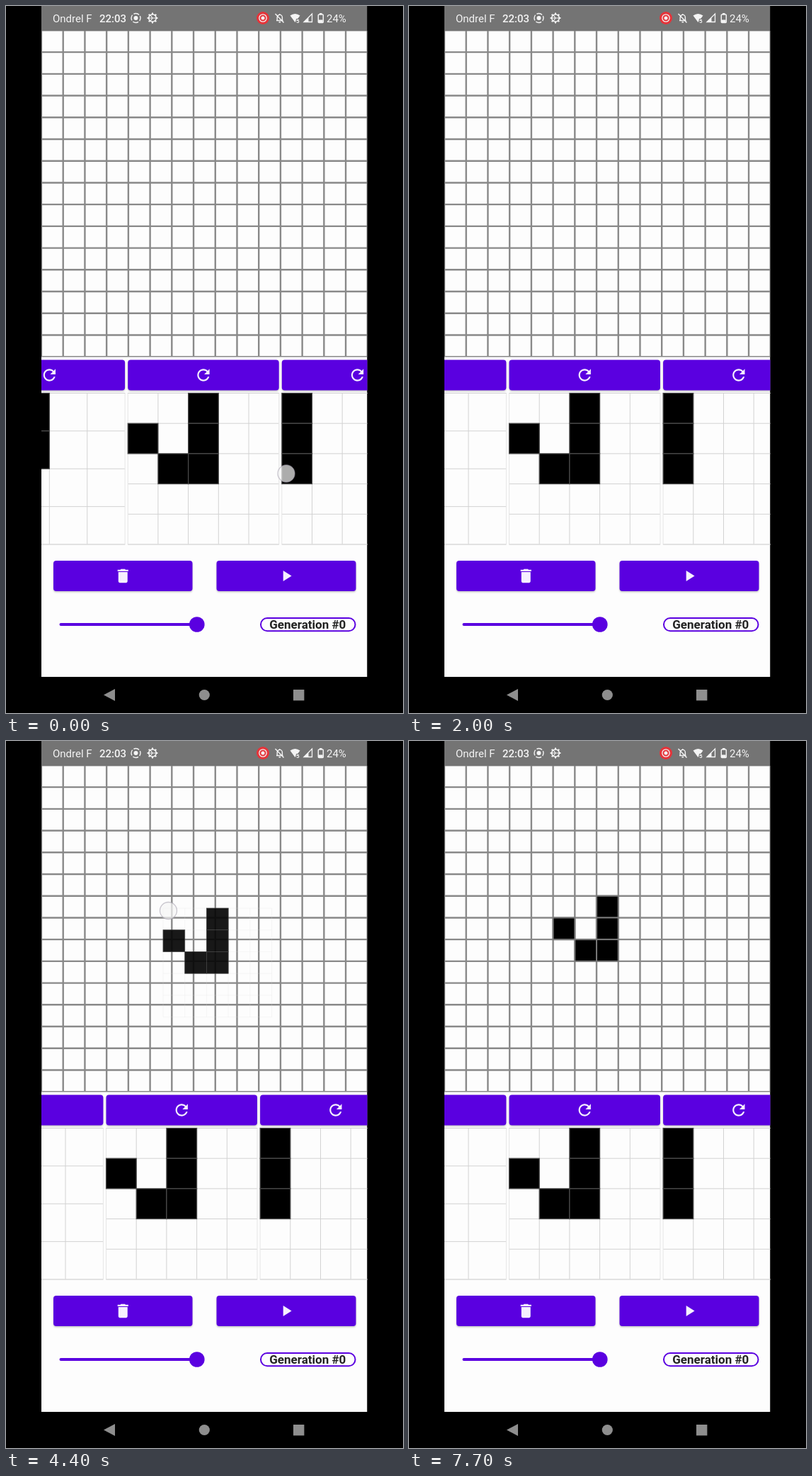
Write an HTML page that moves like this. It is 561x998 px and loops after 7800 ms.

```html
<!DOCTYPE html>
<html lang="en">
<head>
<meta charset="utf-8">
<title>Game of Life</title>
<style>
  html, body { margin: 0; width: 100%; height: 100%; overflow: hidden; background: #000; }
  svg { display: block; width: 100%; height: 100%; }
  text { font-family: Roboto, "Noto Sans", sans-serif; }
  .status { font-size: 15px; fill: #f4f4f4; }
  .line { fill: none; stroke: #f4f4f4; }
</style>
</head>
<body>
<svg id="stage" viewBox="0 0 561 998"></svg>
<script>
const LOOP = 7800, STEP = 100;
const PURPLE = '#5a00e0';
const BOARD = { x: 50, y: 34.4, cell: 30.72, n: 15 };
const PITCH = 217.6, PANEL = 213.5, PANEL_Y = 546.5;
const HOOK = [[2, 0], [0, 1], [2, 1], [1, 2], [2, 2]];
const BLOCK = [[0, 0], [1, 0], [0, 1], [1, 1]];
const BAR = [[0, 0], [0, 1], [0, 2]];
const ICONS = {
  refresh: 'M17.65 6.35C16.2 4.9 14.21 4 12 4c-4.42 0-7.99 3.58-7.99 8s3.57 8 7.99 8c3.73 0 6.84-2.55 7.73-6h-2.08c-.82 2.33-3.04 4-5.65 4-3.31 0-6-2.69-6-6s2.69-6 6-6c1.66 0 3.14.69 4.22 1.78L13 11h7V4l-2.35 2.35z',
  trash: 'M6 19c0 1.1.9 2 2 2h8c1.1 0 2-.9 2-2V7H6v12zM19 4h-3.5l-1-1h-5l-1 1H5v2h14V4z',
  play: 'M8 5v14l11-7z'
};

// Rows are [time, value...]
const SCROLL = [[0, 172.2], [200, 197], [500, 244.8], [700, 254], [900, 254], [1000, 240],
  [1100, 220.8], [1300, 188], [1500, 163], [1700, 147], [1900, 141.5]];
const TOUCHES = [
  [[0, 396, 660], [200, 430, 656], [500, 477, 651], [600, 480, 651]],
  [[900, 420, 658], [1100, 377, 657], [1500, 317, 651]],
  [[2700, 270, 640], [3400, 270, 636], [3600, 268, 560], [3800, 264, 396], [3900, 262, 319],
    [4100, 252, 262], [4500, 222, 232], [4800, 217, 226], [5300, 217, 226]]
];
const DRAG = { start: 3200, drop: 5300, lag: 100, dx: -15, dy: -11 };

const rect = (x, y, w, h, fill, extra = '') =>
  `<rect x="${x}" y="${y}" width="${w}" height="${h}" fill="${fill}" ${extra}/>`;
const path = (d, extra) => `<path d="${d}" ${extra}/>`;
const circle = (x, y, r, extra) => `<circle cx="${x}" cy="${y}" r="${r}" ${extra}/>`;

function icon(name, x, y) {
  return path(ICONS[name], `fill="#f6f0ff" transform="translate(${x} ${y}) scale(1.08) translate(-12 -12)"`);
}

function button(x, y, w, name) {
  return rect(x, y + 1.5, w, 43, '#000', 'rx="4" opacity=".22" filter="url(#soft)"') +
    rect(x, y, w, 43, PURPLE, 'rx="4"') + icon(name, x + w / 2, y + 21.5);
}

function gridPath(x, y, size, n, from, to) {
  let d = '';
  for (let i = from; i <= to; i++) {
    const p = i * size / n;
    d += `M${x + p} ${y}v${size}M${x} ${y + p}h${size}`;
  }
  return d;
}

function cells(list, x, y, size, fill, stroke, width) {
  return list.map(([c, r]) => rect(x + c * size, y + r * size, size, size, fill,
    `stroke="${stroke}" stroke-width="${width}"`)).join('');
}

function panel(index, n, list) {
  const x = index * PITCH, size = PANEL / n;
  return button(x, 499.5, PANEL, 'refresh') +
    path(gridPath(x, PANEL_Y, PANEL, n, 1, n - 1), 'stroke="#d2d2d2" fill="none"') +
    rect(x, PANEL_Y, PANEL, PANEL, 'none', 'stroke="#e6e6e6"') +
    path(`M${x} ${PANEL_Y}h${PANEL}m0 ${PANEL}h${-PANEL}`, 'stroke="#d2d2d2" fill="none"') +
    cells(list, x, PANEL_Y, size, '#000', '#4c4c4c', 1.2);
}

function statusBar() {
  let teeth = '';
  for (let a = 0; a < 360; a += 45) teeth += path('M207 9.6v3', `class="line" stroke-width="2" transform="rotate(${a} 207 17)"`);
  return rect(50, 0, 460.5, 35, '#747474') +
    '<text class="status" x="66" y="22.5">Ondrel F</text>' +
    '<text class="status" x="132" y="22.5" font-weight="500">22:03</text>' +
    '<text class="status" x="453" y="22.5">24%</text>' +
    circle(183.5, 17, 6.5, 'class="line" stroke-width="1.4" stroke-dasharray="8.2 2" stroke-dashoffset="4"') +
    circle(183.5, 17, 3, 'fill="#f4f4f4"') +
    teeth + circle(207, 17, 5.3, 'class="line" stroke-width="1.6"') +
    path('M202 17h10M207 17l-3-4.5M207 17l-3 4.5', 'class="line" stroke-width="1.2"') +
    circle(363, 17, 9, 'fill="#e5343a"') +
    circle(363, 17, 5.2, 'class="line" stroke-width="1.3"') + circle(363, 17, 2.5, 'fill="#f4f4f4"') +
    path('M382 20.5h9.5M383.2 20v-4a3.6 3.6 0 0 1 7.2 0v4M386.8 11v1.5M385.5 22.8h2.6M380.5 11l12 12.5', 'class="line" stroke-width="1.4"') +
    path('M401.5 13.5q7-5 14 0l-7 9.5z', 'fill="#f4f4f4"') +
    '<text x="410" y="23.5" font-size="8" font-weight="700" fill="#f4f4f4" stroke="#747474" stroke-width="2" paint-order="stroke">5</text>' +
    path('M421 22.5h11.5V11z', 'class="line" stroke-width="1.3"') +
    path('M420.5 23l7-7v7z', 'fill="#f4f4f4"') +
    rect(441.3, 12, 7, 11.5, 'none', 'rx="1" stroke="#f4f4f4" stroke-width="1.5"') +
    rect(443, 10, 3.6, 2, '#f4f4f4') + rect(442, 19.5, 5.6, 3.5, '#f4f4f4');
}

function controls() {
  return button(67, 783, 196.5, 'trash') + button(297.5, 783, 197, 'play') +
    path('M77.5 873H270', `stroke="${PURPLE}" stroke-width="4" stroke-linecap="round"`) +
    circle(269.8, 873, 10.8, `fill="${PURPLE}"`) +
    rect(360, 864, 133.5, 18.3, '#fdfdfd', `rx="9.1" stroke="${PURPLE}" stroke-width="2"`) +
    '<text x="426.3" y="879" text-anchor="middle" font-size="17" font-weight="700" fill="#222">Generation #0</text>';
}

function navBar() {
  return path('M138 972.5L154 964v17z', 'fill="#8e8e8e"') +
    circle(280.3, 972.5, 7.6, 'fill="#8e8e8e"') + rect(406, 965, 15.4, 15.4, '#8e8e8e');
}

const side = BOARD.cell * BOARD.n;
const ghostSide = BOARD.cell * 5;
document.getElementById('stage').innerHTML = `
  <defs>
    <clipPath id="screen"><rect x="50" y="0" width="460.5" height="947"/></clipPath>
    <clipPath id="board"><rect x="50" y="35" width="460.5" height="460.5"/></clipPath>
    <filter id="soft" x="-5%" y="-20%" width="110%" height="150%"><feGaussianBlur stdDeviation="1.3"/></filter>
  </defs>
  <rect width="561" height="998" fill="#000"/>
  <g clip-path="url(#screen)">
    ${rect(50, 35, 460.5, 912, '#fdfdfd')}
    <g clip-path="url(#board)">
      ${path(gridPath(BOARD.x, BOARD.y, side, BOARD.n, 0, BOARD.n), 'stroke="#898989" stroke-width="2.4" fill="none"')}
      <g id="placed">${cells(HOOK, BOARD.x + 5 * BOARD.cell, BOARD.y + 6 * BOARD.cell, BOARD.cell, '#000', '#777', 2)}</g>
    </g>
    <g id="carousel">${panel(-1, 4, BLOCK)}${panel(0, 5, HOOK)}${panel(1, 5, BAR)}</g>
    ${controls()}
    ${statusBar()}
    <g id="ghost">
      ${path(gridPath(0, 0, ghostSide, 5, 0, 5), 'stroke="#d8d8d8" stroke-opacity=".22" fill="none"')}
      <g opacity=".92">${cells(HOOK, 0, 0, BOARD.cell, '#050505', '#333', 0.8)}</g>
    </g>
    <g id="finger">${circle(0, 0, 12, 'fill="#f5f5f5" fill-opacity=".7" stroke="#aaa5b2" stroke-opacity=".6" stroke-width="1.3"')}</g>
  </g>
  ${navBar()}`;

const [placed, carousel, ghost, finger] =
  ['placed', 'carousel', 'ghost', 'finger'].map(id => document.getElementById(id));

function sample(rows, t) {
  const i = rows.findIndex(r => r[0] > t);
  if (i === 0) return rows[0].slice(1);
  if (i < 0) return rows[rows.length - 1].slice(1);
  const a = rows[i - 1], b = rows[i], k = (t - a[0]) / (b[0] - a[0]);
  return a.slice(1).map((v, j) => v + (b[j + 1] - v) * k);
}

const show = (el, on) => el.setAttribute('visibility', on ? 'visible' : 'hidden');
const move = (el, x, y) => el.setAttribute('transform', `translate(${x} ${y})`);

function draw(t) {
  move(carousel, sample(SCROLL, t)[0], 0);

  const touch = TOUCHES.find(rows => t >= rows[0][0] && t < rows[rows.length - 1][0]);
  show(finger, touch);
  if (touch) move(finger, ...sample(touch, t));

  const [x, y] = sample(TOUCHES[2], t - DRAG.lag);
  move(ghost, x + DRAG.dx, y + DRAG.dy);
  show(ghost, t >= DRAG.start && t < DRAG.drop);
  show(placed, t >= DRAG.drop);
}

const began = performance.now();
function tick() {
  const t = (performance.now() - began) % LOOP;
  draw(Math.floor(t / STEP) * STEP);
  requestAnimationFrame(tick);
}
draw(0);
requestAnimationFrame(tick);
</script>
</body>
</html>
```
